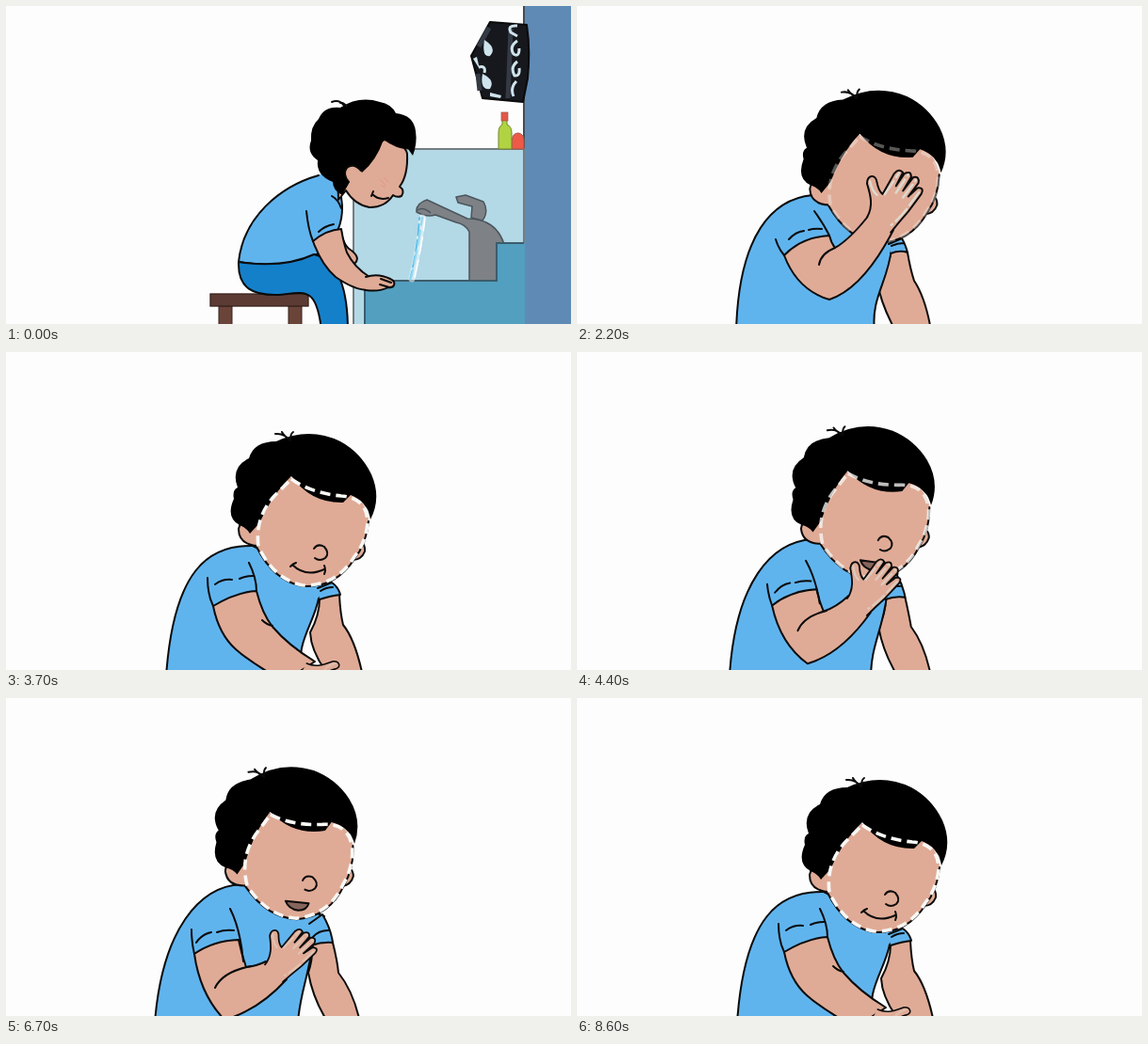
These frames come from a looping animation (600x338 px, 8700 ms). An HTML page:

```html
<!DOCTYPE html>
<html lang="en">
<head>
<meta charset="utf-8">
<title>Washing up</title>
<style>
  html, body { margin: 0; width: 100%; height: 100%; overflow: hidden; background: #fdfdfd; }
  svg { display: block; width: 100vw; height: 100vh; }
  .ln { stroke: #0b0b0b; stroke-width: 2; stroke-linecap: round; stroke-linejoin: round; }
  .none { fill: none; }
  .skin { fill: #e0ab96; }
  .shirt { fill: #60b4ee; }
  .pants { fill: #1580ca; }
  .grey { stroke: #4b565c; stroke-width: 1.5; stroke-linejoin: round; }
</style>
</head>
<body>
<svg viewBox="0 0 600 338" preserveAspectRatio="none">
  <rect width="600" height="338" fill="#fdfdfd"/>

  <g id="sink">
    <rect x="551" width="49" height="338" fill="#5f8ab5"/>
    <path d="M550 0V338" stroke="#454c55" stroke-width="2"/>
    <path d="M369 340V152H550V340Z" fill="#b3d8e6" stroke="#737d82" stroke-width="2"/>

    <path d="M514 17L553 20Q557 45 554 77L549 102L506 98L494 53Z" fill="#16181d" class="ln"/>
    <path d="M502 43L513 23M501 72L503 90M536 24L533 98" stroke="#343943" stroke-width="5" fill="none"/>
    <g fill="#cfe3ec">
      <path d="M508 36Q522 45 514 53Q505 55 508 36Z"/>
      <path d="M506 72Q520 79 514 88Q503 90 506 72Z"/>
      <path d="M514 92L526 95L525 98L514 96ZM496 56L500 54L503 67Z"/>
    </g>
    <path d="M502 65Q510 63 508 71M543 21Q532 20 536 28L543 32M543 37Q534 43 539 51Q545 55 545 45M543 59Q535 65 540 74Q546 75 545 66M542 80Q535 87 539 96" fill="none" stroke="#cfe3ec" stroke-width="3"/>

    <path d="M537 152V143Q538 135 544 135Q550 136 550 143V152Z" fill="#ee5a47" stroke="#a0574b"/>
    <path d="M527 121H532V126Q537 128 537 135V152H523V135Q523 128 527 126Z" fill="#b1d343" stroke="#71872f"/>
    <rect x="526" y="113" width="7" height="9" fill="#e2574a" stroke="#a0574b" stroke-width=".7"/>

    <path d="M447 206L490 226Q520 226 529 253L521 262V292H492V240Q488 232 478 230L456 222Q447 225 436 219Q435 210 447 206Z" fill="#7e8185" class="grey"/>
    <path d="M478 203L488 201L507 208Q513 219 506 228L494 225L495 213L480 209Z" fill="#7e8185" class="grey"/>
    <path d="M437 217Q443 213 451 220" class="none grey"/>
    <path d="M381 340V292H521V252H551V340Z" fill="#539fc0"/>
    <path d="M381 340V292H521V252H550" class="none" stroke="#3c5c6b" stroke-width="2"/>
    <g id="water" fill="none" stroke-linecap="round"></g>

    <path d="M226 319H240V340H226ZM300 319H314V340H300Z" fill="#6b4439" stroke="#38221d"/>
    <rect x="217" y="306" width="104" height="13" fill="#5c3b35" stroke="#38221d" stroke-width="1.3"/>

    <path id="aFar" class="ln skin"/>
    <path id="aShirt" class="ln shirt"/>
    <path id="aPants" class="ln pants"/>
    <g id="aHead">
      <path class="ln skin" d="M402 142Q424 146 426 157Q427 180 418 192Q424 196 420 202Q415 204 411 201Q403 214 386 214Q370 211 361 196L353 206L352 176Z"/>
      <path d="M401 142Q393 165 378 177Q371 166 363 171Q356 177 365 187L357 201Q347 196 347 187Q329 180 331 164Q319 156 324 143Q323 128 332 120Q338 106 355 108Q375 95 397 102Q409 104 414 114Q433 116 435 133Q437 146 432 159L427 152Q414 152 401 142Z"/>
      <path class="none ln" d="M359 106Q354 99 346 102M362 107Q358 102 355 103" stroke-width="3"/>
      <path class="skin" d="M377 175Q369 166 362 172Q357 179 364 187L374 190Z"/>
      <path class="none ln" d="M377 175Q369 166 362 172Q357 179 364 187M389 200Q396 207 406 204M390 197L388 202"/>
      <path d="M396 184l8 7M401 182l6 6M398 190l5 3" stroke="#e58b86" opacity=".7"/>
    </g>
    <path id="aArm" class="ln skin"/>
    <path id="aSleeve" class="none ln"/>
    <g id="aHand">
      <path class="ln skin" d="M-3 -7C6 -10 15 -9 23 -5C30 -2 28 5 21 4Q12 9 -3 7"/>
      <path class="none ln" d="M13 -5L24 -1M12 1L22 4" stroke-width="1.4"/>
    </g>
  </g>

  <g id="close">
    <path id="bFar" class="ln skin"/>
    <path id="bShirt" class="ln shirt"/>
    <path id="bCuff" class="ln shirt"/>
    <g id="bHead">
      <path class="ln skin" d="M372 203Q382 201 381 212Q377 222 366 221"/>
      <path class="ln skin" d="M268 180Q250 174 247 188Q247 204 266 206"/>
      <path class="skin" d="M302 133L330 148L370 150Q386 166 385 183Q383 203 370 220Q350 251 315 249Q284 243 266 207Q264 178 285 150Z"/>
      <path class="none ln" d="M385 180Q383 203 370 220Q350 251 315 249Q284 243 266 207"/>
      <path d="M303 132Q287 147 275 170L269 182L259 193Q256 187 248 184Q233 176 242 156Q240 147 246 144Q238 123 258 113Q263 95 287 95Q322 79 355 95Q377 107 388 130Q399 155 387 178Q385 168 383 166Q377 156 366 152L358 160Q324 161 303 132Z"/>
      <path class="none ln" d="M301 94Q296 86 286 87M302 94Q295 89 293 85M302 93Q302 87 305 85"/>
      <path id="ring" fill="none" stroke="#f8f8f5" stroke-width="3.6" stroke-dasharray="11 6" d="M303 135Q324 150 356 153Q384 155 384 182Q382 203 369 219Q350 249 315 248Q285 242 268 207Q264 176 285 153Z"/>
      <g id="face" class="none ln">
        <path d="M327 209Q331 203 338 207Q344 214 339 219Q333 223 328 219"/>
        <path id="smile" d="M302 228Q305 225 308 224M304 226Q318 240 338 231M338 227Q340 232 338 236"/>
        <path id="grin" fill="#86655c" d="M306 228L330 234Q327 241 318 240Q308 237 306 228Z"/>
      </g>
    </g>
    <path id="bArm" class="ln skin"/>
    <path id="bCrease" class="none ln"/>
    <path id="bSleeve" class="none ln"/>
    <g id="bHand">
      <path class="ln skin" d="M-15 4C-16 -9 -25 -17 -35 -25C-40 -33 -33 -39 -27 -32Q-20 -25 -15 -25L-17 -50Q-16 -58 -10 -56L-8 -40L-8 -56Q-4 -63 0 -57L1 -40L2 -58Q7 -63 10 -56L9 -38L12 -51Q18 -56 19 -48L18 -25Q16 -10 15 4"/>
      <path id="foam" fill="none" stroke="#dce6df" stroke-width="2.4" stroke-linecap="round" stroke-dasharray="17 5" d="M-34 -29Q-25 -20 -17 -21M-13 -26L-13 -53M-4 -34L-4 -57M5 -34L6 -57M16 -48L15 -25Q14 -12 11 -3"/>
    </g>
  </g>
</svg>
<script>
const LOOP = 8700, CUT = 1750, CYCLE = 2450, CYCLE_START = 2200;
const $ = id => document.getElementById(id);
const ease = x => { x = Math.min(1, Math.max(0, x)); return x * x * (3 - 2 * x); };
const lerp = (a, b, p) => a + (b - a) * p;

// Blend two paths that share the same commands.
function mix(a, b, p) {
  const end = b.match(/-?[\d.]+/g);
  let i = 0;
  return a.replace(/-?[\d.]+/g, n => lerp(+n, +end[i++], p).toFixed(2));
}

function blend(prefix, a, b, p) {
  for (const k in a.d) $(prefix + k).setAttribute('d', mix(a.d[k], b.d[k], p));
  const [x, y, r] = a.head.map((v, i) => lerp(v, b.head[i], p));
  $(prefix + 'Head').setAttribute('transform', `translate(${x} ${y}) rotate(${r} ${a.pivot})`);
  const [hx, hy, hr, hs] = a.hand.map((v, i) => lerp(v, b.hand[i], p));
  $(prefix + 'Hand').setAttribute('transform', `translate(${hx} ${hy}) rotate(${hr}) scale(${hs})`);
}

const lean = {
  pivot: '380 150', head: [0, 0, 0], hand: [385, 295, 0, 1],
  d: {
    Far: 'M356 240Q358 255 367 260Q377 268 370 274Q364 270 358 268L345 262',
    Shirt: 'M332 180C290 192 252 225 247 272Q295 280 330 264Q358 245 357 212L354 185L345 172',
    Pants: 'M247 272C246 300 262 308 290 307C318 304 330 298 335 345L363 345C363 300 352 270 327 264Q295 279 247 272',
    Arm: 'M326 250Q335 275 350 288Q370 302 385 302L386 288Q370 278 362 262Q358 250 356 237Q340 238 326 250',
    Sleeve: 'M319 218Q321 238 326 250M332 240Q338 234 348 232M346 202Q353 206 356 215'
  }
};
const sip = {
  pivot: lean.pivot, head: [-23, -20, 9], hand: [382, 205, -42, 1.25],
  d: {
    Far: 'M335 247Q350 263 362 265Q370 275 362 285Q354 280 348 269L335 262',
    Shirt: 'M318 178C280 195 260 235 256 276Q300 282 335 266Q338 255 335 242L350 205L328 165',
    Pants: 'M257 276C256 300 275 306 300 306C322 302 330 300 333 345L363 345C364 300 362 272 340 266Q300 282 257 276',
    Arm: 'M335 242Q352 256 370 257Q384 250 391 206L373 204Q370 213 362 220Q356 218 348 210Q339 222 335 242',
    Sleeve: 'M313 212Q322 230 335 242M331 228Q334 217 343 205M333 192Q343 196 348 206'
  }
};

const rest = {
  pivot: '315 165', head: [0, 0, 0], hand: [316, 343, 120, .8], ring: 1, foam: .3, face: 1,
  d: {
    Far: 'M354 258Q355 278 358 290Q371 306 379 345L344 345Q324 320 323 298Q333 280 333 262',
    Shirt: 'M262 206C216 205 178 230 170 345L315 345C306 310 326 292 332 262L345 245Q300 225 262 206',
    Cuff: 'M331 251L346 245Q353 250 355 258Q345 259 333 263M334 254Q340 250 347 250',
    Arm: 'M220 270Q226 300 244 316Q262 332 296 350L328 329Q300 312 283 292Q272 278 266 254Q245 255 220 270',
    Crease: 'M272 285Q277 290 283 291',
    Sleeve: 'M214 240Q214 258 220 270M266 254Q266 240 258 224M222 247Q230 241 240 242M248 241Q254 238 262 238'
  }
};
const chest = {
  pivot: rest.pivot, head: [-18, -13, -8], hand: [287, 290, 44, .88], ring: 1, foam: .4, face: 1,
  d: {
    Far: 'M347 260Q352 280 353 292Q369 312 376 345L342 345Q326 320 321 292Q326 278 325 262',
    Shirt: 'M250 198C206 200 166 245 158 345L310 345C312 315 320 300 326 262L338 232Q290 212 250 198',
    Cuff: 'M322 240L336 230Q345 245 347 260Q336 259 324 263M326 254Q332 247 342 247',
    Arm: 'M200 272Q206 315 232 342Q268 332 298 299L276 280Q266 285 255 286Q250 272 247 257Q220 258 200 272',
    Crease: 'M222 308Q230 291 260 285',
    Sleeve: 'M197 246Q197 260 200 272M252 280Q249 246 238 224M202 260Q208 251 218 249M224 249Q232 246 242 247'
  }
};
const cover = {
  pivot: rest.pivot, head: [-1, 3, -3], hand: [323, 229, 34, 1], ring: .35, foam: .8, face: 0,
  d: {
    Far: 'M351 262Q354 280 358 292Q370 310 376 345L338 345Q322 315 319 293Q332 275 333 262',
    Shirt: 'M250 201C208 205 172 242 169 345L316 345C312 310 330 294 334 258L345 243Q300 225 250 201',
    Cuff: 'M331 253L345 247Q349 254 351 262Q343 259 333 263M334 255Q340 252 347 252',
    Arm: 'M220 265Q234 302 268 312Q304 300 336 238L311 221Q290 248 274 257Q270 252 268 244Q238 246 220 265',
    Crease: 'M257 275Q259 263 274 257',
    Sleeve: 'M211 248Q214 258 220 265M268 244Q262 232 252 218M225 248Q232 240 241 239M246 238Q252 236 260 237'
  }
};
const wipe = {
  pivot: rest.pivot, head: [-1, 3, -3], hand: [315, 246, 58, .87], ring: .35, foam: .8, face: 0,
  d: {
    Far: cover.d.Far,
    Shirt: 'M250 201C208 205 174 242 171 345L308 345C308 310 330 296 334 258L345 243Q300 225 250 201',
    Cuff: cover.d.Cuff,
    Arm: 'M228 271Q234 300 256 304Q294 309 324 257L307 235Q288 252 275 261Q271 254 269 245Q244 250 228 271',
    Crease: 'M257 277Q260 268 275 261',
    Sleeve: 'M214 238Q220 258 228 271M269 245Q260 228 250 213M230 259Q235 250 243 246M247 234Q253 231 260 232'
  }
};

const keys = [
  [0, cover], [300, cover], [650, wipe], [1100, rest], [1550, rest],
  [1950, chest], [2080, chest], [2380, cover], [CYCLE, cover]
];

const streams = [['#f1fbff', 7], ['#58bbe6', 1.8], ['#8fd8f2', 2], ['#fdffff', 1.6]].map(([color, width]) => {
  const p = document.createElementNS('http://www.w3.org/2000/svg', 'path');
  p.setAttribute('stroke', color);
  p.setAttribute('stroke-width', width);
  $('water').append(p);
  return p;
});

function drawSink(t) {
  blend('a', lean, sip, ease((t - 200) / 600));
  streams.forEach((p, i) => {
    const x = 442 + (i ? (i - 2) * 3 : 0), sway = Math.sin(t / 90 + i * 2) * 1.5;
    p.setAttribute('d', `M${x} 225Q${x - 3 + sway} 255 ${x - 11 + sway} 290`);
    if (i) {
      p.setAttribute('stroke-dasharray', `${9 + 3 * i} ${4 + i}`);
      p.setAttribute('stroke-dashoffset', -t * .12 - i * 7);
    } else p.setAttribute('opacity', .55);
  });
}

function drawClose(t) {
  const c = (t - CYCLE_START + CYCLE) % CYCLE;
  const i = keys.findIndex(k => c < k[0]);
  const [t0, a] = keys[i - 1], [t1, b] = keys[i];
  const p = ease((c - t0) / (t1 - t0));
  blend('b', a, b, p);
  $('ring').setAttribute('opacity', lerp(a.ring, b.ring, p));
  $('foam').setAttribute('opacity', lerp(a.foam, b.foam, p));
  $('face').style.display = lerp(a.face, b.face, p) > .4 ? '' : 'none';
  const open = (p < .5 ? a : b) === chest;
  $('grin').style.display = open ? '' : 'none';
  $('smile').style.display = open ? 'none' : '';
}

function draw(now) {
  const t = now % LOOP, first = t < CUT;
  $('sink').style.display = first ? '' : 'none';
  $('close').style.display = first ? 'none' : '';
  first ? drawSink(t) : drawClose(t);
}

const start = performance.now();
function tick() {
  draw(performance.now() - start);
  requestAnimationFrame(tick);
}
tick();
</script>
</body>
</html>
```
